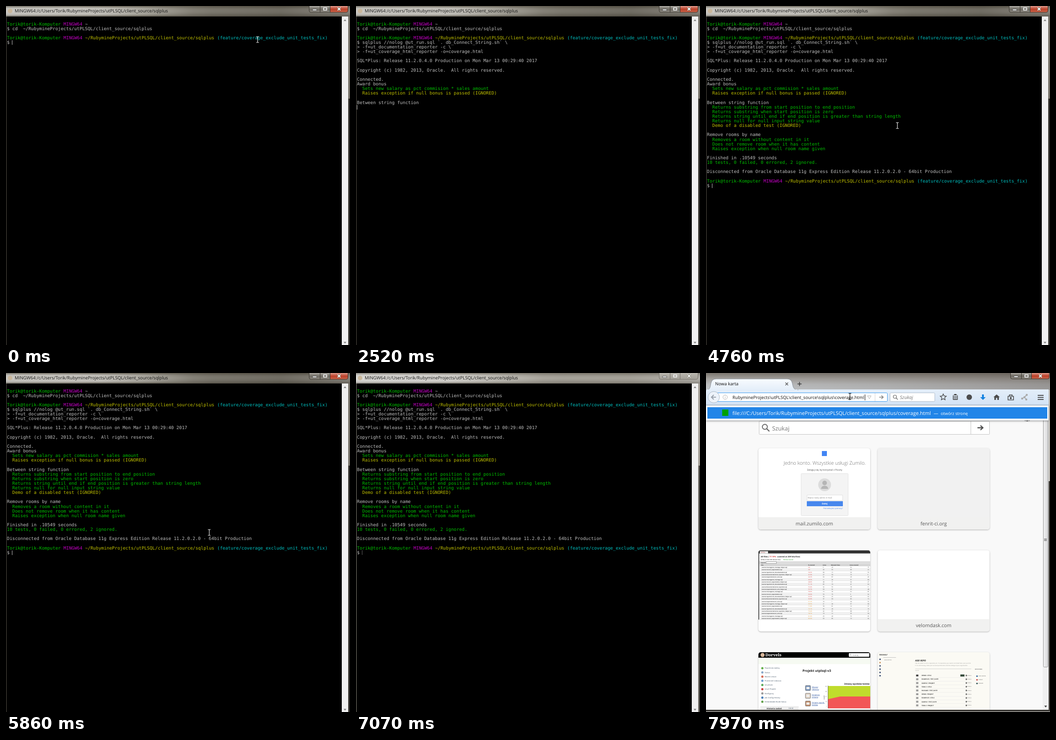
These frames come from a looping animation (754x743 px, 8000 ms). An HTML page with a canvas:

```html
<!DOCTYPE html>
<html lang="en">
<head>
<meta charset="utf-8">
<title>Terminal and browser</title>
<style>
html, body { margin: 0; width: 100%; height: 100%; overflow: hidden; background: #000; }
canvas { display: block; }
</style>
</head>
<body>
<canvas id="stage" width="754" height="743"></canvas>
<script>
const ctx = document.getElementById('stage').getContext('2d');
ctx.textRendering = 'geometricPrecision';

const LOOP = 8000, W = 754, H = 743;
const SANS = '"Open Sans", "Noto Sans", sans-serif';
const MONO = '"DejaVu Sans Mono", monospace';
const CELL = 5.91, ROW = 10.12, TOP = 34.5;

// ---------- drawing helpers ----------
function rect(x, y, w, h, fill) {
  ctx.fillStyle = fill;
  ctx.fillRect(x, y, w, h);
}
function box(x, y, w, h, r, fill, stroke) {
  ctx.beginPath();
  ctx.roundRect(x, y, w, h, r);
  if (fill) { ctx.fillStyle = fill; ctx.fill(); }
  if (stroke) { ctx.strokeStyle = stroke; ctx.lineWidth = 1; ctx.stroke(); }
}
function disc(x, y, r, fill, stroke, width = 1) {
  ctx.beginPath();
  ctx.arc(x, y, r, 0, 7);
  if (fill) { ctx.fillStyle = fill; ctx.fill(); }
  if (stroke) { ctx.strokeStyle = stroke; ctx.lineWidth = width; ctx.stroke(); }
}
function path(d, x, y, fill, stroke, width = 1) {
  const shape = new Path2D(d);
  ctx.save();
  ctx.translate(x, y);
  if (fill) { ctx.fillStyle = fill; ctx.fill(shape); }
  if (stroke) { ctx.strokeStyle = stroke; ctx.lineWidth = width; ctx.stroke(shape); }
  ctx.restore();
}
// y is the middle of the capital letters
function label(str, x, y, size, color, style = '', align = 'left') {
  ctx.font = `${style} ${size}px ${SANS}`;
  ctx.textAlign = align;
  ctx.fillStyle = color;
  ctx.fillText(str, x, y + size * 0.357);
}
function gradient(x0, y0, x1, y1, ...colors) {
  const g = ctx.createLinearGradient(x0, y0, x1, y1);
  colors.forEach((c, i) => g.addColorStop(i / (colors.length - 1), c));
  return g;
}
// Progress 0..1 in n equal jumps, the first at t0 and the last at t1
function jumps(t, t0, t1, n) {
  if (t < t0) return 0;
  return Math.min(1, (Math.floor((t - t0) / (t1 - t0) * (n - 1) + 1e-6) + 1) / n);
}
const mix = (a, b, k) => a + (b - a) * k;

function ibeam(x, y, color) {
  path('M-3-6.5H-1L0-5.5 1-6.5H3M0-5.5V5.5M-3 6.5H-1L0 5.5 1 6.5H3', x, y, null, color, 1.2);
}
function windowButtons(x, height, active) {
  const plain = active ? gradient(0, 0, 0, height, '#a9a69f', '#6f6b63', '#8d8981')
                       : gradient(0, 0, 0, height, '#b9b6ae', '#a3a098');
  const red = active ? gradient(0, 0, 0, height, '#dc9a8c', '#bd3f28', '#c9664c') : plain;
  const edge = active ? '#38342d' : '#77736a';
  box(x + .5, -4, 24, height + 4, [0, 0, 0, 4], plain, edge);
  box(x + 24.5, -4, 22, height + 4, 0, plain, edge);
  box(x + 46.5, -4, 39, height + 4, [0, 0, 4, 0], red, edge);
  box(x + 8, height / 2, 9, 3, 0, '#fff', '#555');
  box(x + 31.5, 3.5, 8, 6, 0, null, '#555');
  ctx.strokeStyle = '#fff';
  ctx.lineWidth = 1.6;
  ctx.strokeRect(x + 32, 4, 7, 5);
  path('M-3-3L3 3M3-3L-3 3', x + 66, 6.5, null, '#554', 3.4);
  path('M-3-3L3 3M3-3L-3 3', x + 66, 6.5, null, '#fff', 2);
}

// ---------- terminal ----------
const FG = '#bfbfbf', GREEN = '#00bf00', YELLOW = '#bfbf00', PINK = '#bf00bf', CYAN = '#00bfbf';
const DIR = '~/RubymineProjects/utPLSQL/client_source/sqlplus';
const user = [[GREEN, 'Torik@torik-Komputer '], [PINK, 'MINGW64 ']];
const prompt = [...user, [YELLOW, DIR + ' '], [CYAN, '(feature/coverage_exclude_unit_tests_fix)']];
const plain = s => [[FG, s]], pass = s => [[GREEN, s]], ignored = s => [[YELLOW, s]];
const lines = [
  [...user, [FG, '~']],
  plain('$ cd  ' + DIR),
  [],
  prompt,
  plain('$ sqlplus //nolog @ut_run.sql `. db_Connect_String.sh` \\'),
  plain('> -f=ut_documentation_reporter -c \\'),
  plain('> -f=ut_coverage_html_reporter -o=coverage.html'),
  [],
  plain('SQL*Plus: Release 11.2.0.4.0 Production on Mon Mar 13 00:29:40 2017'),
  [],
  plain('Copyright (c) 1982, 2013, Oracle.  All rights reserved.'),
  [],
  plain('Connected.'),
  plain('Award bonus'),
  pass('  Sets new salary as pct commision * sales amount'),
  ignored('  Raises exception if null bonus is passed (IGNORED)'),
  [],
  plain('Between string function'),
  pass('  Returns substring from start position to end position'),
  pass('  Returns substring when start position is zero'),
  pass('  Returns string until end if end position is greater than string length'),
  pass('  Returns null for null input string value'),
  ignored('  Demo of a disabled test (IGNORED)'),
  [],
  plain('Remove rooms by name'),
  pass('  Removes a room without content in it'),
  pass('  Does not remove room when it has content'),
  pass('  Raises exception when null room name given'),
  [],
  plain('Finished in .10549 seconds'),
  pass('10 tests, 0 failed, 0 errored, 2 ignored.'),
  [],
  plain('Disconnected from Oracle Database 11g Express Edition Release 11.2.0.2.0 - 64bit Production'),
  [],
  prompt,
  plain('$'),
];
// time, finished lines, caret row, caret column
const output = [
  [0, 4, 4, 2], [800, 7, 6, 47], [1050, 7, 7, 0], [1580, 11, 11, 0], [1660, 13, 13, 0],
  [2520, 18, 18, 0], [2600, 31, 32, 0], [3530, 33, 33, 0], [3750, 36, 35, 2],
];
const caretOff = [[80, 620], [2140, 2520], [3130, 3530], [4230, 4760], [5325, 5860], [6390, 6880]];

function terminalLine(segments, row) {
  let col = 0;
  ctx.font = `9.81px ${MONO}`;
  ctx.textAlign = 'left';
  for (const [color, str] of segments) {
    ctx.fillStyle = color;
    ctx.fillText(str, 2 + col * CELL, TOP + row * ROW + 8);
    col += str.length;
  }
}
function terminalPointer(t) {
  const move = (t0, t1, n, [x0, y0], [x1, y1]) => {
    const k = jumps(t, t0, t1, n);
    ibeam(mix(x0, x1, k), mix(y0, y1, k), '#e8e8e8');
  };
  if (t < 620) move(80, 390, 5, [551.5, 73.5], [527.5, 115.5]);
  else if (t >= 3130 && t < 5080) move(3210, 3380, 3, [415.5, 188], [419.5, 262]);
  else if (t >= 5080 && t < 6090) move(5080, 5410, 5, [419.5, 262], [445.5, 349.5]);
  else if (t >= 6090 && t < 6880) move(6090, 6710, 9, [445.5, 349.5], [425, -10]);
}
function terminal(t) {
  const active = t < 6880;
  rect(0, 0, W, H, active ? '#59554b' : '#8f8b81');
  rect(0, 0, W, 23, active
    ? gradient(0, 0, W, 0, '#aaa79f', '#a5a197', '#8c887c', '#69655a', '#5c584d', '#77736a')
    : gradient(0, 0, W, 0, '#c6c4bf', '#bfbcb5', '#aaa69c', '#99958b', '#98948a', '#aaa7a0'));
  rect(0, 0, W, 23, gradient(0, 0, 0, 23, 'rgba(50,44,32,.35)', 'rgba(255,255,255,.12)', 'rgba(40,36,28,.25)'));
  rect(0, 3, 410, 17, gradient(0, 0, 410, 0, 'rgba(255,255,255,.3)', 'rgba(255,255,255,.35)', 'rgba(255,255,255,0)'));
  disc(9, 11, 5, '#c9b79c');
  label('MINGW64:/c/Users/Torik/RubymineProjects/utPLSQL/client_source/sqlplus', 19, 11, 9.7, '#111');
  windowButtons(664, 14, active);

  rect(1, 23, 735, H - 23, '#000');
  rect(736, 23, 14, H - 23, '#f0f0f0');
  path('M-3 2L0-2 3 2Z', 743, 31, '#858585');
  path('M-3-2L0 2 3-2Z', 743, 738, '#858585');
  rect(750, 23, 4, 180, active ? '#77736a' : '#a5a198');
  rect(750, 203, 4, H - 203, active ? '#3a3833' : '#6c6962');
  rect(753, 203, 1, H - 203, '#111');

  const [, done, row, col] = output.findLast(step => t >= step[0]);
  lines.slice(0, done).forEach(terminalLine);
  if (done === 4) terminalLine(plain('$'), 4);

  const x = Math.floor(2 + col * CELL), y = Math.round(TOP + row * ROW);
  if (!active) for (let i = 0; i < 10; i += 2) rect(x, y + i, 1, 1, FG);
  else if (!caretOff.some(([a, b]) => t >= a && t < b)) rect(x, y, 1, 10, FG);
  terminalPointer(t);
}

// ---------- browser ----------
const INK = '#4c4c4c';

function magnifier(x, y, r, color) {
  disc(x, y, r, null, color, r * .35);
  path(`M${r * .7} ${r * .7}L${r * 1.8} ${r * 1.8}`, x, y, null, color, r * .4);
}
function rightArrow(x, y, s, color) {
  path(`M${-s} 0H${s}M${s * .1} ${-s * .8}L${s} 0 ${s * .1} ${s * .8}`, x, y, null, color, s * .38);
}
function star(x, y, r) {
  ctx.beginPath();
  for (let i = 0; i < 10; i++) {
    const a = i * Math.PI / 5 - Math.PI / 2, d = i % 2 ? r * .48 : r;
    ctx.lineTo(x + d * Math.cos(a), y + d * Math.sin(a));
  }
  ctx.closePath();
  ctx.strokeStyle = INK;
  ctx.lineWidth = 1.4;
  ctx.stroke();
}
function gear(x, y) {
  for (let i = 0; i < 12; i++) {
    ctx.save();
    ctx.translate(x, y);
    ctx.rotate(i * Math.PI / 6);
    rect(-1.8, -10.5, 3.6, 4, '#6a6a6a');
    ctx.restore();
  }
  disc(x, y, 7.6, null, '#6a6a6a', 3.2);
}
function toolbarIcons() {
  star(520, 53, 7);
  box(541.5, 48.5, 10, 10, 1, null, INK);
  rect(544, 46, 5, 3, INK);
  for (let y = 51; y < 58; y += 3) rect(541, y, 11, 1.4, INK);
  disc(577, 53, 6, INK);
  path('M-2-6H2V0H6L0 6-6 0H-2Z', 607, 53, '#1583e0');
  path('M-7 0L0-6 7 0H5V6H1.5V1.5H-1.5V6H-5V0Z', 637, 53, INK);
  path('M-6-2H6V6H-6ZM-3-2V-5H3V-2', 668, 53, null, INK, 1.6);
  disc(668, 55, 2.2, INK);
  path('M-5 3L0 0 5-5M0 0L4 5', 698, 53, null, '#aaa', 1.8);
  [[-5, 3], [0, 0], [5, -5], [4, 5]].forEach(([x, y]) => disc(698 + x, 53 + y, 2.3, '#aaa'));
  for (let y = 48; y < 59; y += 4.5) rect(727, y, 13, 2, INK);
}
function chrome(t) {
  rect(0, 0, W, H, '#77716a');
  rect(0, 0, W, 37, gradient(0, 0, 0, 37, '#7b766f', '#a3a09c', '#bcbdbe', '#c3c6c9'));
  rect(0, 0, W, 37, gradient(0, 0, W, 0, 'rgba(60,50,42,0)', 'rgba(60,50,42,.12)', 'rgba(60,50,42,.3)'));
  windowButtons(667, 13, true);
  rect(0, 36, 751, 35, gradient(0, 36, 0, 71, '#e4eef9', '#d3e3f5'));
  rect(0, 70, 751, 1, '#a9b8c9');
  path('M0 37C10 37 9 30 11 22Q13 13 22 13H178Q187 13 189 22C191 30 191 37 202 37Z', 0, 0,
    gradient(0, 13, 0, 37, '#f8fbfe', '#e4eef9'), '#8b939c');
  rect(1, 36, 200, 2, '#e4eef9');
  label('Nowa karta', 20, 24, 9.6, '#111');
  path('M-3-3L3 3M3-3L-3 3', 177, 24, null, '#555', 1.4);
  path('M-4.5 0H4.5M0-4.5V4.5', 205, 24, null, '#333', 1.4);

  box(20.5, 43.5, 377, 19, 2, '#fff', '#3c9bef');
  disc(17, 53, 12.5, '#edf3fa', '#a9b6c4');
  path('M5 0H-5M0-5L-5 0 0 5', 17, 53, null, '#9ba3ad', 2.2);
  disc(42, 53, 4.8, null, '#b5b5b5');
  rect(41.5, 52, 1, 3.5, '#b5b5b5');
  rect(41.5, 50, 1, 1, '#b5b5b5');
  rect(370, 44, 1, 18, '#d5d5d5');
  rightArrow(384, 53, 4.5, '#888');
  if (t < 7590) path('M-4-3H4L0 4Z', 358, 53, '#1583e0');
  else path('M-4-3H4L0 3.5Z', 358, 53, null, '#b0b0b0');
  box(403.5, 43.5, 98, 19, 2, '#fff', '#aebccb');
  magnifier(414, 52, 3.5, '#666');
  label('Szukaj', 425, 53.5, 10.2, '#777', 'italic');
  if (t < 7890) {
    label('Wprowadź adres lub szukaj', 59, 53.5, 10.1, '#777', 'italic');
  } else {
    label('RubymineProjects\\utPLSQL\\client_source\\sqlplus\\coverage.html', 58, 53.5, 9.7, '#111');
    rect(348, 47, 1, 13, '#111');
  }
  toolbarIcons();
}
function card(x, y, name, draw, band = true) {
  ctx.save();
  ctx.shadowColor = 'rgba(0,0,0,.3)';
  ctx.shadowBlur = 3;
  ctx.shadowOffsetY = 1;
  box(x, y, 245, 178, 5, '#fff');
  ctx.restore();
  ctx.save();
  ctx.beginPath();
  ctx.roundRect(x, y, 245, 178, 5);
  ctx.clip();
  ctx.translate(x, y);
  if (draw) draw();
  if (band) rect(0, 151, 245, 27, '#f1f1f0');
  ctx.restore();
  label(name, x + 122.5, y + 165, 10.7, '#555', '', 'center');
}
function loginThumb() {
  rect(139, 6, 11, 11, '#4285f4');
  label('Jedno konto. Wszystkie usługi Zumilo.', 145, 32, 10.8, '#666', '300', 'center');
  label('Zaloguj się, by korzystać z Poczty', 145, 47.5, 5.1, '#444', '', 'center');
  box(93.5, 55.5, 103, 92, 1, '#f4f4f4', '#e2e2e2');
  disc(145, 80, 14, '#dcdcdc');
  disc(145, 76, 5, '#b5b5b5');
  path('M-8 7Q-7 0 0 0T8 7Z', 145, 82, '#b5b5b5');
  box(106.5, 102.5, 78, 12, 0, '#fff', '#e0e0e0');
  label('Wpisz swój adres e-mail', 108, 108.5, 4.8, '#888');
  rect(106, 116, 79, 11, '#4787ed');
  label('Dalej', 145, 121.5, 4.8, '#fff', 'bold', 'center');
  label('Potrzebujesz pomocy?', 185, 131.5, 4.1, '#427fed', '', 'right');
}
function reportThumb() {
  rect(0, 0, 245, 7, '#333');
  rect(0, 0, 1.5, 152, '#333');
  rect(3, 2, 18, 5, '#eee');
  label('All files', 5, 4.5, 3, '#a22');
  label('All files (', 5, 14.5, 4.2, '#222', 'bold');
  label('77.19%', 24, 14.5, 4.2, '#c33', 'bold');
  label('covered at 239 hits/line)', 41, 14.5, 4.2, '#222', 'bold');
  label('45 files in total. 980 relevant lines.', 5, 21, 2.6, '#333', 'bold');
  label('756 lines covered', 54, 21, 2.6, '#393', 'bold');
  rect(2, 24, 243, 6, '#ddd');
  label('Search:', 5, 27, 3, '#333', 'bold');
  box(16.5, 25, 23, 4, 0, '#fff', '#999');
  rect(3, 30, 242, 5, '#d5d5d5');
  ['File', '% covered', 'Lines', 'Relevant lines', 'Lines covered'].forEach((s, i) =>
    label(s, [6, 109, 141, 159, 200][i], 32.5, 2.8, '#222', 'bold'));
  const words = ['coverage', 'reporters', 'expectations', 'core', 'documentation'];
  for (let i = 0; i < 22; i++) {
    const y = 37.5 + i * 5.33, part = words[i * 3 % 5];
    if (i % 2) rect(3, y - 2.6, 242, 5.3, '#f1f1f1');
    rect(3, y + 2.4, 242, .5, '#ccc');
    label(`source/${part}/ut_${words[i * 7 % 5]}${i % 3 ? '' : '_helper'}.sql`, 7, y, 2.8, '#333', 'bold');
    label(i < 2 ? '0.0' : (35 + i * 2.3).toFixed(1) + '%', 109, y, 3, i < 14 ? '#c33' : '#db8a1d');
    [141, 160, 201, 239].forEach((x, k) => label(String((i * 37 + k * 23) % 90 + 6), x, y, 3, '#333'));
  }
}
function projectThumb() {
  rect(0, 0, 245, 12, '#000');
  disc(9, 6, 4.5, '#d8b79b');
  ctx.font = 'bold 9px "Noto Serif", serif';
  ctx.textAlign = 'left';
  ctx.fillStyle = '#fff';
  ctx.fillText('Dorvels', 15, 9);
  box(198, 2, 45, 8, 1, '#fff');
  magnifier(202, 5.5, 1.4, '#777');
  label('Szukaj', 206, 6, 4.5, '#777');
  rect(0, 12, 245, 14, '#f6faf2');
  const menu = ['Powrót do tablicy', 'Status', 'Recent zmian', 'Przestrzeń robocza', 'Uruchom',
    'Usuń Projekt', 'Konfiguruj', 'Job Config History', 'Embeddable Build Status'];
  const tint = ['#62b04a', '#88a7c8', '#d56a55', '#6c9fd2', '#59a85a', '#c44', '#999', '#4a7fba', '#62a04a'];
  menu.forEach((s, i) => {
    disc(8.5, 35 + i * 9.2, 2.5, tint[i]);
    label(s, 13.5, 35 + i * 9.2, 4.1, '#456');
  });
  rect(4, 118, 84, 9, '#eee');
  label('Historia zadań', 18, 123, 4.6, '#333', 'bold');
  label('trend', 66, 123, 4, '#456');
  label('Projekt utplsql-v3', 96.5, 40.5, 7.1, '#222', 'bold');
  ['Obszar|roboczy', 'Ostatnie|zmiany', 'Ostatni wynik|testów'].forEach((s, i) => {
    const y = 78 + i * 17;
    box(103, y - 5, 11, 11, 1, ['#7895bd', '#e3d4c4', '#c38b66'][i], '#777');
    rect(105, y - 2, 7, 5, '#eee');
    s.split('|').forEach((part, k) => {
      label(part, 117, y - 2 + k * 5, 4.3, '#2b539f');
      rect(117, y + .3 + k * 5, part.length * 2.2, .4, '#2b539f');
    });
  });
  label('Zmiany wyników testów', 188, 69, 4.6, '#111', 'bold');
  rect(152, 74, 93, 49, '#c0dc2c');
  path('M152 103L179 97H245V123H152Z', 0, 0, '#f25656');
  rect(152, 73, .7, 50, '#555');
  for (let i = 0; i < 5; i++) label(String(35 - i * 7), 150, 75 + i * 11, 3, '#555', '', 'right');
  ctx.save();
  ctx.translate(144, 104);
  ctx.rotate(-Math.PI / 2);
  label('count', 0, 0, 3.5, '#333');
  ctx.restore();
}
function reposThumb() {
  rect(0, 0, 245, 178, '#fbfaf4');
  label('TESSIVOLT', 3, 5.5, 3.8, '#222', 'italic bold');
  rect(12, 11, 28, .7, '#aaa');
  label('ADD REPOS', 14, 17, 3, '#777');
  for (let i = 0; i < 6; i++) rect(3.5, 14 + i * 7.2, 3, 3, i === 1 ? '#c96' : '#457');
  label('ADD REPO', 82, 18, 5, '#222', 'italic bold');
  label('Flip the switch to turn a repository on. If a repository you need is not listed here, sync your list.', 82, 24, 2.8, '#888');
  label('If it is still missing, check your account permissions and the settings of your organisation.', 82, 29, 2.8, '#888');
  rect(82, 36, 123, .6, '#bbb');
  label('Search', 82, 40, 2.8, '#999');
  for (let i = 0; i < 9; i++) {
    const y = 51 + i * 8.2;
    box(84, y - 2, 5, 4, 0, i ? '#999' : '#444');
    label(['DEMO', 'EXAMPLES', 'SAMPLE', 'TOOLS', 'PACKAGE'][i % 5] + ' / ' + ['UTILS', 'TEST_SUITE', 'PROJECT'][i % 3],
      96, y, 3.2, '#333', 'bold');
    if (!i) rect(181, y - 2.3, 9, 4.6, '#354b3b');
    rect(193, y - 1.5, 2, 3, '#333');
    label('DETAILS', 196, y, 2.5, '#555');
    rect(82, y + 4, 123, .4, '#ddd');
  }
  label('REPOSITORIES', 213, 37, 2.3, '#555', 'bold');
  for (let i = 0; i < 3; i++) {
    rect(216, 51 + i * 8, 3, 3, ['#369', '#c44', '#355'][i]);
    label(['SYNC REPOS', 'PUBLIC', 'PRIVATE'][i], 221, 52.5 + i * 8, 2.7, '#555');
  }
}
function page() {
  rect(0, 71, 738, 667, '#f9f9f9');
  gear(704, 95.5);
  box(116.5, 105.5, 505, 29, 1, '#fff', '#c3c3c3');
  rect(580, 106, 1, 28, '#c3c3c3');
  magnifier(129, 118, 5.5, '#666');
  label('Szukaj', 145, 121, 12.8, '#777');
  rightArrow(601, 120, 6, '#4c4c4c');

  ctx.save();
  ctx.beginPath();
  ctx.rect(0, 71, 738, 667);
  ctx.clip();
  card(115, 165, 'mail.zumilo.com', loginThumb);
  card(376.5, 165, 'fenrit-ci.org', () => rect(0, 0, 245, 178, '#f1f1f1'));
  card(115, 388.5, '', reportThumb, false);
  card(376.5, 388.5, 'velomdask.com');
  card(115, 612, '', projectThumb);
  card(376.5, 612, '', reposThumb);
  ctx.restore();

  rect(738, 71, 13, 667, '#f0f0f0');
  box(739.5, 86.5, 10, 558, 2, gradient(739, 0, 750, 0, '#f5f5f5', '#d6d6d8'), '#999');
  for (let y = 363; y < 369; y += 2) rect(741, y, 6, 1, '#666');
  path('M-3 2L0-2 3 2Z', 744.5, 79, '#444');
  path('M-3-2L0 2 3-2Z', 744.5, 731, '#444');
  rect(751, 37, 3, 200, '#bdbab5');
  rect(751, 237, 3, 501, '#403d39');
  rect(0, 738, W, 1, '#5c5954');
  rect(0, 739, W, 2, '#262522');
  rect(0, 741, W, 2, '#8d8a86');
}
function suggestion() {
  ctx.save();
  ctx.shadowColor = 'rgba(0,0,0,.45)';
  ctx.shadowBlur = 4;
  ctx.shadowOffsetY = 1;
  rect(0, 71, 751, 33, '#fcfcfc');
  ctx.restore();
  rect(3, 75, 745, 25, '#2185e8');
  rect(35.5, 80, 13.5, 14, '#00a000');
  label('file:///C:/Users/Torik/RubymineProjects/utPLSQL/client_source/sqlplus/coverage.html', 58, 88, 11.02, '#fff');
  label('—', 499, 88, 10, '#fff');
  label('otwórz stronę', 514.5, 88.5, 9.2, '#fff');
}
function browser(t) {
  chrome(t);
  page();
  if (t >= 7890) suggestion();
  if (t < 7590) path('M0 0V13L3 10.3 5 15 7.3 14 5.2 9.5H9.3Z', 359.5, 49, '#fff', '#111');
  else ibeam(mix(359.5, 315.5, jumps(t, 7590, 7740, 3)), 51, '#111');
}

function frame(now) {
  const t = now % LOOP;
  if (t < 7510) terminal(t);
  else browser(t);
  requestAnimationFrame(frame);
}
requestAnimationFrame(frame);
</script>
</body>
</html>
```
